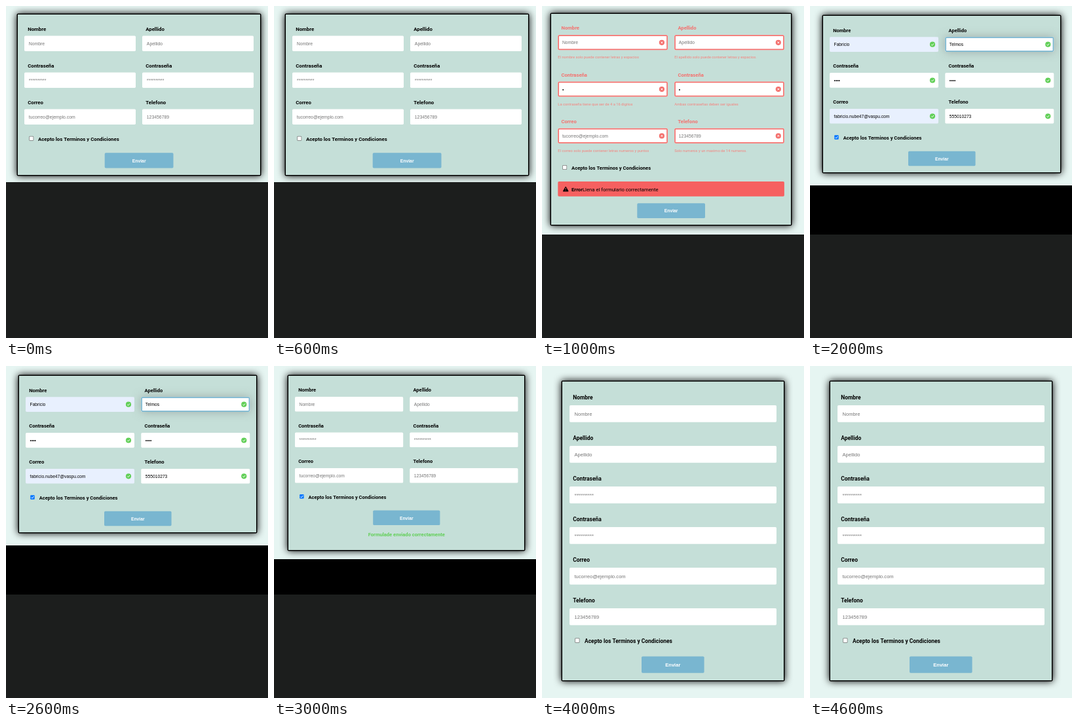
Recreate the animation shown at these times as an HTML page with a canvas. Size 400 by 507 pixels, loop 5 s.

```html
<!DOCTYPE html>
<html lang="es">
<head>
<meta charset="utf-8">
<title>Formulario</title>
<style>
  html, body { margin: 0; width: 100%; height: 100%; overflow: hidden; background: #1c1e1d; }
  canvas { display: block; width: 400px; height: 507px; }
</style>
</head>
<body>
<canvas id="stage"></canvas>
<script>
const W = 400, H = 507, STEP = 1000;
const SANS = 'Roboto, "Open Sans", sans-serif';
const ARIAL = '"Liberation Sans", Arial, sans-serif';
const COLOR = {
  dark: '#1c1e1d', page: '#e6f5f2', card: '#c5dfd8', button: '#79b6d0',
  error: '#f66060', errorText: '#f4716e', hint: '#f5827d', ok: '#62cf58',
  autofill: '#e8f0fe', placeholder: '#757575', check: '#0075ff'
};

const canvas = document.getElementById('stage');
const ctx = canvas.getContext('2d');
const dpr = window.devicePixelRatio || 1;
canvas.width = W * dpr;
canvas.height = H * dpr;

const LABELS = ['Nombre', 'Apellido', 'Contraseña', 'Contraseña', 'Correo', 'Telefono'];
const STARS = '*'.repeat(10);
const BLANK = ['Nombre', 'Apellido', STARS, STARS, 'tucorreo@ejemplo.com', '123456789'];
const FILLED = ['Fabricio', 'Telmos', '••••', '••••', 'fabricio.nube47@vaspu.com', '555010273'];
const HINTS = [
  'El nombre solo puede contener letras y espacios',
  'El apellido solo puede contener letras y espacios.',
  'La contraseña tiene que ser de 4 a 16 digitos',
  'Ambas contraseñas deben ser iguales',
  'El correo solo puede contener letras numeros y puntos',
  'Solo numeros y un maximo de 14 numeros.'
];

// card, button: x, y, w, h; cols: left edges; box: checkbox x, y, size; tick: caption x, y
const SCREENS = [
  { light: 269, card: [18, 13, 370, 245], cols: [28, 208], top: 45.5, pitch: 56, w: 170, h: 23.5,
    label: 7.8, font: 6.85, box: [35.2, 198.8, 7], tick: [49, 203], button: [150.7, 224.2, 104.8, 23.3] },
  { light: 349, card: [14, 12, 366, 322], cols: [24.3, 202.2], top: 44.2, pitch: 71.3, w: 167.6, h: 23,
    label: 7.65, font: 6.75, box: [31.2, 243, 6.9], tick: [45, 247], button: [145.3, 301.3, 103.7, 22.7],
    state: 'error' },
  { light: 274, black: true, card: [20, 15, 362, 239], cols: [30, 206.3], top: 47.3, pitch: 54.8, w: 166, h: 22.6,
    label: 7.55, font: 6.7, box: [37.2, 197.2, 6.5], tick: [50.7, 201], button: [150, 221.7, 102.6, 22.6],
    state: 'ok', checked: true },
  { light: 295, black: true, card: [22, 15, 360, 266], cols: [32, 207.3], top: 47, pitch: 54.5, w: 165.2, h: 22.6,
    label: 7.5, font: 6.7, box: [39.1, 196.1, 6.5], tick: [52.5, 200], button: [151.2, 220.6, 102.2, 22.5],
    checked: true, sent: true },
  { light: 507, card: [31, 23.7, 338, 456.3], cols: [42], top: 60, pitch: 62, w: 316, h: 25.8,
    label: 8.45, font: 7.55, box: [50.2, 415.5, 7.2], tick: [65, 420], button: [152, 443.5, 95.6, 25.3] }
];

function rect(x, y, w, h, color, r = 0) {
  ctx.fillStyle = color;
  ctx.beginPath();
  ctx.roundRect(x, y, w, h, r);
  ctx.fill();
}

// y is the middle of the capitals
function text(str, x, y, size, color, { bold = false, family = SANS, align = 'left' } = {}) {
  ctx.font = `${bold ? 700 : 400} ${size}px ${family}`;
  ctx.textAlign = align;
  ctx.fillStyle = color;
  ctx.fillText(str, x, y + size * 0.355);
  return ctx.measureText(str).width;
}

function line(points, color, width) {
  ctx.strokeStyle = color;
  ctx.lineWidth = width;
  ctx.beginPath();
  points.forEach(([x, y]) => ctx.lineTo(x, y));
  ctx.stroke();
}

function glow(blur, color, paint) {
  ctx.save();
  ctx.shadowBlur = blur * dpr;
  ctx.shadowColor = color;
  paint();
  ctx.restore();
}

function badge(x, y, ok) {
  ctx.fillStyle = ok ? COLOR.ok : COLOR.errorText;
  ctx.beginPath();
  ctx.arc(x, y, 4.1, 0, Math.PI * 2);
  ctx.fill();
  if (ok) {
    line([[x - 1.9, y + 0.1], [x - 0.5, y + 1.5], [x + 2, y - 1.3]], '#fff', 1);
  } else {
    line([[x - 1.4, y - 1.4], [x + 1.4, y + 1.4]], '#fff', 1);
    line([[x + 1.4, y - 1.4], [x - 1.4, y + 1.4]], '#fff', 1);
  }
}

function frame(x, y, w, h, color) {
  ctx.strokeStyle = color;
  ctx.lineWidth = 1.7;
  ctx.beginPath();
  ctx.roundRect(x + 0.85, y + 0.85, w - 1.7, h - 1.7, 1.2);
  ctx.stroke();
}

function field(s, i) {
  const n = s.cols.length;
  const x = s.cols[i % n], y = s.top + s.pitch * Math.floor(i / n);
  const { w, h } = s;
  const mid = y + h / 2;
  const bad = s.state === 'error', ok = s.state === 'ok';
  const focused = ok && i === 1;
  const password = i === 2 || i === 3;

  text(LABELS[i], x + 5.2, y - h * 0.455, s.label, bad ? COLOR.errorText : '#000', { bold: true });

  const fill = ok && (i === 0 || i === 4) ? COLOR.autofill : '#fff';
  const paint = () => rect(x, y, w, h, fill, 1.7);
  if (focused) glow(14, 'rgba(120,120,120,.5)', paint);
  else paint();
  if (bad) frame(x, y, w, h, COLOR.errorText);
  if (focused) frame(x, y, w, h, COLOR.button);

  let value = BLANK[i];
  if (ok) value = FILLED[i];
  else if (bad && password) value = '•';
  const typed = ok || (bad && password);
  text(value, x + h * 0.29, mid + 0.2, s.font, typed ? '#000' : COLOR.placeholder, { family: ARIAL });

  if (bad || ok) badge(x + w - 9, mid + 0.1, ok);
  if (bad) text(HINTS[i], x, y + h + 11, 5.75, COLOR.hint);
}

function checkbox([x, y, size], checked) {
  if (checked) {
    rect(x, y, size, size, COLOR.check, 1);
    line([[x + 1.2, y + size * 0.53], [x + size * 0.4, y + size * 0.75], [x + size - 1.1, y + size * 0.26]], '#fff', 1);
  } else {
    rect(x, y, size, size, '#767676', 1.2);
    rect(x + 0.7, y + 0.7, size - 1.4, size - 1.4, '#fff', 0.7);
  }
}

function alertBar() {
  rect(24.3, 268, 345.6, 22.8, COLOR.error, 1.7);
  ctx.lineJoin = 'round';
  ctx.fillStyle = '#000';
  ctx.beginPath();
  ctx.moveTo(36.2, 276);
  ctx.lineTo(40.1, 282.9);
  ctx.lineTo(32.3, 282.9);
  ctx.closePath();
  ctx.fill();
  ctx.strokeStyle = '#000';
  ctx.lineWidth = 1;
  ctx.stroke();
  rect(35.7, 277.5, 1, 2.8, COLOR.error);
  rect(35.6, 281.2, 1.2, 1.1, COLOR.error, 0.5);
  const w = text('Error', 45, 279.8, 7.7, '#000', { bold: true });
  text('Llena el formulario correctamente', 45 + w, 279.8, 7.7, '#000');
}

function drawScreen(s) {
  rect(0, 0, W, H, COLOR.dark);
  if (s.black) rect(0, 274, W, 75, '#000');
  rect(0, 0, W, s.light, COLOR.page);

  const [x, y, w, h] = s.card;
  ctx.save();
  ctx.beginPath();
  ctx.rect(0, 0, W, s.light);
  ctx.clip();
  glow(12, '#000', () => rect(x - 1.5, y - 1.5, w + 3, h + 3, '#000', 2));
  ctx.restore();
  rect(x, y, w, h, COLOR.card);

  LABELS.forEach((_, i) => field(s, i));
  checkbox(s.box, s.checked);
  text('Acepto los Terminos y Condiciones', s.tick[0], s.tick[1], s.label, '#000', { bold: true });
  if (s.state === 'error') alertBar();

  const [bx, by, bw, bh] = s.button;
  rect(bx, by, bw, bh, COLOR.button, 1.7);
  text('Enviar', bx + bw / 2, by + bh / 2 + 0.3, s.font, '#fff', { bold: true, family: ARIAL, align: 'center' });
  if (s.sent) {
    text('Formulade enviado correctamente', 202.3, 257.5, 7.6, COLOR.ok, { bold: true, align: 'center' });
  }
}

const start = performance.now();

function tick() {
  const t = Math.max(0, performance.now() - start);
  ctx.setTransform(dpr, 0, 0, dpr, 0, 0);
  drawScreen(SCREENS[Math.floor(t / STEP) % SCREENS.length]);
  requestAnimationFrame(tick);
}
tick();
</script>
</body>
</html>
```
